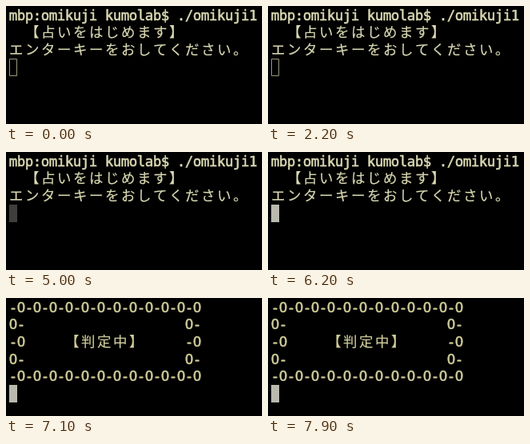
These frames come from a looping animation (320x148 px, 8000 ms). An HTML page with a canvas:

```html
<!DOCTYPE html>
<html lang="ja">
<head>
<meta charset="utf-8">
<title>omikuji</title>
<style>
html, body { margin: 0; width: 100%; height: 100%; overflow: hidden; background: #000; }
canvas { display: block; width: 320px; height: 148px; }
</style>
</head>
<body>
<canvas id="stage"></canvas>
<script>
const LOOP = 8000;
const CELL = 10, ROW = 21.6, LEFT = 4, BASE = 17.8;
const INK = '#d9d8b2', GOLD = '#cfcb98', BLOCK = '#b9b9ae';
const MONO = '17.4px "DejaVu Sans Mono", monospace';
const KANA = '500 17.4px "Noto Sans CJK JP", "Noto Sans CJK", sans-serif';

const FOCUS = 4000;   // hollow cursor becomes a blinking block
const JUDGE = 7100;   // second screen appears

const stage = document.getElementById('stage');
const ctx = stage.getContext('2d');
const ratio = window.devicePixelRatio || 1;
stage.width = 320 * ratio;
stage.height = 148 * ratio;
ctx.scale(ratio, ratio);
ctx.lineJoin = 'round';

// Writes slightly thickened text on the terminal grid; wide characters take two cells.
function put(text, col, row, color) {
  ctx.fillStyle = ctx.strokeStyle = color;
  for (const ch of text) {
    const wide = ch > '\u2fff';
    const x = LEFT + col * CELL - (wide ? 0 : 0.2);
    const y = BASE + row * ROW;
    ctx.font = wide ? KANA : MONO;
    ctx.lineWidth = wide ? 0.2 : 0.55;
    ctx.fillText(ch, x, y);
    ctx.strokeText(ch, x, y);
    col += wide ? 2 : 1;
  }
}

function cursor(row, level) {
  ctx.globalAlpha = level;
  ctx.fillStyle = BLOCK;
  ctx.fillRect(LEFT, Math.round(row * ROW + 1), CELL, 22);
  ctx.globalAlpha = 1;
}

function hollowCursor(row) {
  ctx.strokeStyle = '#99977a';
  ctx.lineWidth = 1;
  ctx.strokeRect(LEFT + 0.5, Math.round(row * ROW + 1) + 0.5, CELL - 1, 21);
}

// Half a second lit, half a second dark, with short fades.
function blink(t) {
  const p = t % 1000;
  return p < 500 ? Math.min(1, (p + 100) / 300) : Math.max(0, 1 - (p - 400) / 200);
}

function promptScreen(t) {
  put('mbp:omikuji kumolab$ ./omikuji1', 0, 0, INK);
  put('【占いをはじめます】', 2, 1, INK);
  put('エンターキーをおしてください。', 0, 2, INK);
  if (t < FOCUS) hollowCursor(3);
  else cursor(3, blink(t));
}

function judgeScreen() {
  const border = '-O'.repeat(12);
  put(border, 0, 0, GOLD);
  put(border, 0, 4, GOLD);
  ['O-', '-O', 'O-'].forEach((pair, i) => {
    put(pair, 0, i + 1, GOLD);
    put(pair, 22, i + 1, GOLD);
  });
  put('【判定中】', 7, 2, GOLD);
  cursor(5, 1);
}

function draw(now) {
  const t = now % LOOP;
  ctx.fillStyle = '#000';
  ctx.fillRect(0, 0, 320, 148);
  if (t < JUDGE) promptScreen(t);
  else judgeScreen();
  requestAnimationFrame(draw);
}
requestAnimationFrame(draw);
</script>
</body>
</html>
```
